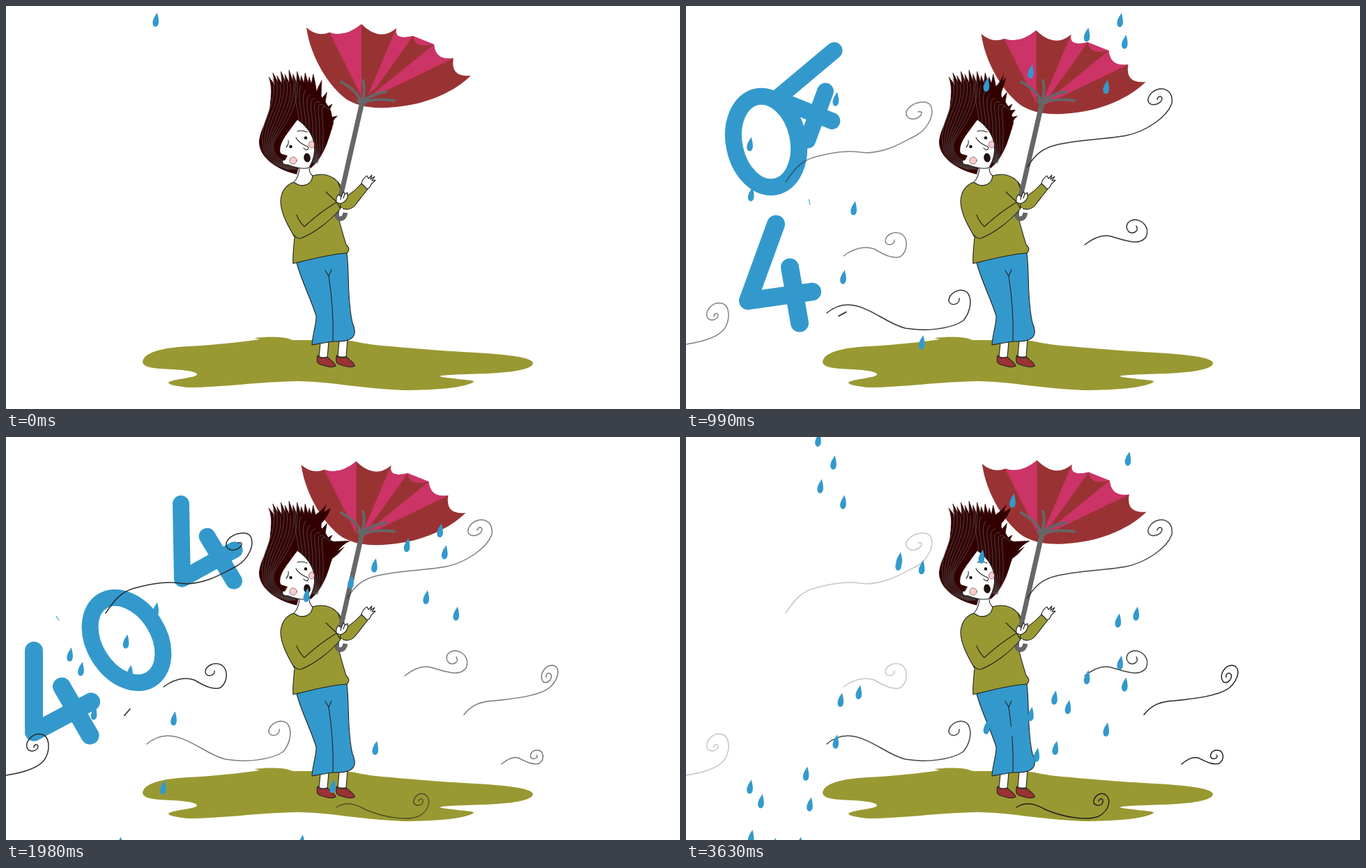
Write an HTML page that moves like this. It is 967x579 px and loops after 3.96 s.

```html
<!DOCTYPE html>
<html lang="en">
<head>
<meta charset="utf-8">
<title>Windy day</title>
<style>
html, body { margin: 0; width: 100%; height: 100%; overflow: hidden; background: #fff; }
svg { display: block; width: 100%; height: 100%; }
.line { fill: none; stroke: #222; stroke-linecap: round; stroke-linejoin: round; }
.ink { stroke: #222; stroke-width: 1.1; stroke-linejoin: round; stroke-linecap: round; }
.thin { stroke-width: .5; }
.digit { fill: none; stroke: #39c; stroke-width: 26; stroke-linecap: round; stroke-linejoin: round; }
.olive { fill: #993; } .blue { fill: #39c; } .red { fill: #933; } .pink { fill: #c36; }
.skin { fill: #fff; } .blush { fill: #fcc; } .hair { fill: #300; } .none { fill: none; }
.grey { fill: none; stroke: #666; stroke-linecap: round; }
</style>
</head>
<body>
<svg viewBox="0 0 967 579">
  <path class="olive" d="M196 511C198 497 225 491 260 489C300 487 335 483 364 479L356 477C372 475 400 474 411 480H485C500 481 510 485 530 487C580 492 650 497 690 499C730 502 757 506 756 514C752 526 700 528 660 529C635 530 615 531 626 533C650 537 672 537 671 540C660 548 620 552 570 552C510 550 470 540 420 539C360 540 310 548 262 548C240 546 230 543 234 540C245 535 275 534 274 529C272 523 240 522 220 521C205 520 196 517 196 511Z"/>

  <g id="canopy">
    <path class="red" d="M431 31Q447 45 464 38Q486 46 510 26Q536 52 560 32Q556 50 584 43Q586 62 614 55Q616 79 642 75Q637 103 667 100C645 122 605 141 560 145C530 148 510 146 490 135C465 118 437 75 431 31Z"/>
    <path class="pink" d="M464 38Q486 46 510 26V130ZM560 32Q556 50 584 43L614 55L520 126ZM614 55Q616 79 642 75L524 132L520 130Z"/>
    <path class="red" d="M584 43Q586 62 614 55L522 130Z"/>
  </g>

  <g id="woman">
    <path class="skin ink" d="M451 484L449 505H461L463 482M478 480L476 504H488L490 478"/>
    <path class="red ink" id="shoe" d="M447 502C445 510 447 514 451 515C458 517 467 521 473 517C472 512 464 508 461 504C456 507 450 505 447 502Z"/>
    <use href="#shoe" x="27.5"/>
    <path class="blue ink" d="M417 369C440 362 465 356 489 355C493 385 489 420 497 455C501 465 502 472 496 477C490 482 480 482 469 482C460 483 450 485 439 487C440 470 446 455 445 445C435 415 424 395 417 369Z"/>
    <path class="none ink" d="M458 380L463 388L467 379M463 388C468 420 470 450 469 482"/>
    <g id="locks" class="hair" stroke="#300" stroke-width=".6"></g>
    <path class="hair" d="M418 242C390 236 364 219 363 196C364 176 379 160 379 138L382 121L440 116L456 134L466 150L470 168C463 190 458 216 436 234Z"/>
    <g id="sway">
      <path class="hair" d="M432 118C445 112 455 104 460 96L456 108L466 102C462 114 456 122 446 130Z"/>
      <path class="hair" d="M452 142L470 150L494 149C484 154 480 159 476 164L486 157C478 168 472 172 464 178Z"/>
    </g>
    <g id="strands" class="none" stroke="#555" stroke-width=".8"></g>
    <path class="skin" d="M421 228L415 250L422 261L438 258L440 244L435 228Z"/>
    <path class="none ink" d="M421 233Q420 245 414 252M435 233Q435 240 440 244"/>
    <path class="skin ink" d="M418 163C404 180 391 194 391 208C395 216 400 214 401 219C394 222 396 229 404 228C415 232 428 235 435 232C441 222 444 210 442 198C440 184 430 171 418 163Z"/>
    <path class="hair" d="M418 163C404 184 390 197 394 212L404 215L400 222C392 220 384 206 387 193C395 178 406 170 418 163Z"/>
    <circle class="blush ink thin" cx="412" cy="222" r="5.2"/>
    <ellipse class="blush ink thin" cx="438.5" cy="199" rx="4" ry="5"/>
    <ellipse cx="432" cy="218" rx="4.8" ry="6.5" fill="#211" transform="rotate(-8 432 218)"/>
    <circle cx="408.5" cy="202" r="2.2"/><circle cx="430" cy="189.500" r="2.2"/>
    <path class="none ink" d="M402 203Q406 199 405 193M418 180Q425 178 432 181M416 189Q420 197 433 202C436 206 430 209 427 204"/>
    <path class="olive ink" d="M462 258L475 252C482 258 484 266 484 275C494 271 502 264 510 255L519 263L501 286C495 293 487 294 480 289Z"/>
    <path class="olive ink" d="M413 253C424 262 438 258 440 244C455 239 469 244 476 253C483 266 481 282 477 303C480 318 485 332 488 343C494 348 492 352 489 355C460 357 430 366 412 370C411 358 413 345 414 332C406 318 394 298 394 280C395 266 402 257 413 253Z"/>
    <path class="none ink" d="M459 267Q467 275 475 282"/>
    <path class="skin ink" d="M510 255Q512 247 518 244L520 248L525 243L523 249L529 245L525 251L530 250L524 256Q522 262 518 263Z"/>
    <g class="grey">
      <path stroke-width="7" stroke-linecap="butt" d="M511 138L480 274M479 292L475 300C474 307 485 309 487 297"/>
      <path stroke-width="4" d="M510 137C504 124 494 116 481 109M511 136Q516 120 512 107M511 137Q526 126 545 123M511 139Q530 132 557 136"/>
      <path stroke-width="7" d="M507 136L511 141L518 134"/>
    </g>
    <path class="skin" d="M478 290L483 290L481 302L478 302Z"/>
    <path class="olive" d="M414 318L428 317L474 282L480 291C466 308 442 327 422 334Z"/>
    <path class="none ink" d="M417 300Q420 309 428 317Q448 298 474 282L480 291C466 308 442 327 422 334Q417 334 413 329"/>
    <path class="skin ink" d="M474 282Q473 274 477 271L481 274L484 267L487 270L490 268L490 275Q487 282 480 284ZM481 274L480 278M486 270L484 276"/>
  </g>

  <g id="lower">
    <path id="four" class="digit" d="M0 0L-40 110L52 97M20 62L34 142"/>
    <path class="line" stroke-width="1.5" d="M90 132L101 126"/>
    <path d="M47 -36L49 -28" stroke="#39c"/>
  </g>
  <ellipse id="zero" class="digit" style="stroke-width:24" rx="46" ry="66"/>
  <g id="upper"><use href="#four" transform="scale(.92)"/></g>

  <g id="winds" class="line" stroke-width="1.5">
    <g class="quick">
      <path d="M143 253C155 235 165 222 185 217C215 209 235 207 258 211C290 210 310 196 330 186C348 176 357 155 351 143C346 135 328 137 319 147C311 157 320 164 329 162C338 159 342 150 333 152"/>
      <path d="M226 359C240 349 255 344 270 349C285 358 298 364 308 360C318 352 319 335 310 328C300 322 286 328 286 338C288 346 300 343 299 336"/>
      <path d="M0 486C20 483 45 477 55 464C65 448 62 428 50 427C38 425 28 437 30 446C33 454 46 452 46 444C45 440 40 442 40 446"/>
    </g>
    <g class="slow">
      <path d="M490 231C500 215 510 205 530 200C560 192 600 192 632 186C660 180 690 160 697 140C699 125 690 118 680 119C668 121 660 132 664 139C670 145 683 140 683 132C681 128 677 130 676 134"/>
      <path d="M572 343C586 332 601 327 613 332C631 337 650 345 660 332C666 318 655 307 643 307C632 309 629 318 636 325C644 328 650 322 646 316"/>
      <path d="M202 441C215 430 230 427 245 431C270 437 290 457 315 463C345 468 380 464 398 452C409 438 411 420 403 411C393 404 377 412 377 424C380 432 393 429 392 420"/>
    </g>
    <g class="fading">
      <path d="M657 399C668 385 680 380 700 379C730 376 765 372 780 360C794 347 796 330 784 328C772 328 764 343 771 352C778 355 784 347 782 341C778 337 774 341 775 345"/>
      <path d="M711 470C719 463 728 459 735 461C745 466 756 472 765 469C774 462 771 450 762 450C753 450 750 459 755 462C760 463 764 460 761 457"/>
      <path d="M474 532C486 524 500 526 515 535C540 546 575 552 592 545C610 535 610 517 600 513C592 510 584 518 585 526C590 532 599 529 598 522C597 518 593 520 592 523"/>
    </g>
  </g>
  <path id="rain" class="blue"/>
</svg>

<script>
const STEP = 330, STEPS = 12;
const BLAST = 9; // the strong gust that tosses everything
const $ = id => document.getElementById(id);

function seeded(seed) {
  return () => (seed = seed * 16807 % 2147483647) / 2147483647;
}

function add(parent, d) {
  const path = document.createElementNS('http://www.w3.org/2000/svg', 'path');
  path.setAttribute('d', d);
  parent.append(path);
}

function place(node, visible, transform) {
  node.setAttribute('visibility', visible ? 'visible' : 'hidden');
  node.setAttribute('transform', transform);
}

// Pointed locks along the top of the head, then down its right side
function addLock(x, y, tipX, tipY) {
  add($('locks'), `M${x - 5} ${y}Q${x - 3} ${y - 18} ${tipX} ${tipY}Q${x + 6} ${y - 14} ${x + 6} ${y}Z`);
}
for (let i = 0; i < 12; i++) {
  const lean = (i - 5) * .8;
  addLock(385 + i * 5, 132, 381 + i * 5 + lean, 97 + Math.abs(i - 5) - i % 2 * 5);
}
for (let i = 0; i < 4; i++) addLock(446 + i * 5, 142 + i * 12, 453 + i * 7.5, 107 + i * 17);

// Strands: one bundle sweeps down the left, another down the right
for (let i = 0; i < 8; i++) {
  add($('strands'), `M${383 + i * 5} ${104 + i % 3 * 4}C${391 + i * 4} 140 ${366 + i * 6} 160 ${368 + i * 3} ${194 - i}S${382 + i * 3} 225 ${404 + i * 2} 235`);
  add($('strands'), `M${416 + i * 7} ${108 + i * 6}C${412 + i * 5} 135 ${420 + i * 5} 150 ${420 + i * 5} ${164 + i * 3}S${446 + i} 205 ${440 + i} 226`);
}

// Each digit drifts through key points; all swing back at the middle one
const keySteps = [2, 4, 6, 8, BLAST];
const digits = [
  { id: 'lower', tilt: 0, swing: -20, points: [[112, 296], [146, 331], [40, 307], [67, 304], [251, 371]] },
  { id: 'zero', tilt: -12, swing: -20, points: [[90, 177], [140, 213], [173, 292], [175, 294], [579, 428]] },
  { id: 'upper', tilt: 30, swing: -51, points: [[172, 111], [253, 17], [251, 96], [317, 106], [451, -47]] }
];

function between(points, step) {
  const i = Math.max(1, keySteps.findIndex(key => key >= step));
  const t = (step - keySteps[i - 1]) / (keySteps[i] - keySteps[i - 1]);
  return points[i].map((to, axis) => points[i - 1][axis] + (to - points[i - 1][axis]) * t);
}

function showDigits(step) {
  const visible = step >= keySteps[0] && step <= BLAST;
  const turn = Math.max(0, 1 - Math.abs(step - 6) / 2);
  for (const { id, tilt, swing, points } of digits) {
    place($(id), visible, visible ? `translate(${between(points, step)}) rotate(${tilt + swing * turn})` : '');
  }
}

// The canopy bobs as a triangle wave, thrown half a period on by the blast
function showCanopy(step) {
  const phase = (step < BLAST ? step : step + 4.5) % 9;
  const drop = 3 * Math.min(phase, 9 - phase);
  place($('canopy'), true, `translate(${-drop * .83} ${drop})`);
}

function showHair(step) {
  const beat = step < BLAST ? step : step - 1;
  const reach = Math.sin(Math.PI * beat / 4) ** 2;
  place($('sway'), reach > .01, `translate(${452 * (1 - reach)} 0) scale(${reach} 1)`);
}

const wave = (step, period) => Math.cos(2 * Math.PI * (step - 2) / period);
const darkness = {
  quick: step => step && .6 + .38 * wave(step, 3.7),
  slow: step => step && .78 + .2 * wave(step, 7.5),
  fading: step => step > 1 ? Math.max(0, 1 - .19 * ((step + 3) % 7)) : 0
};

function showWinds(step) {
  for (const kind in darkness) {
    document.querySelector('.' + kind).setAttribute('opacity', darkness[kind](step));
  }
}

// Rain thickens with time; a few drops hang where they came down
const random = seeded(404);
const drops = Array.from({ length: 30 }, (_, i) => i
  ? { x: 90 + 570 * random(), y: 600 * random() }
  : { x: 215, y: 20 });
const hanging = [[163, 585], [646, 254], [530, 447], [248, 367], [222, 378], [620, 264], [503, 457]];

const drawDrop = (x, y) =>
  `M${x + 2} ${y - 10.5}c-3 4.500 -7 10.500 -6.500 15.500c.5 7 8 6 8.500 -1c.5 -5 -1 -10 -2 -14.500Z`;

function showRain(step) {
  const falling = drops.slice(0, 1 + 8 * Math.sqrt(step));
  const resting = hanging.slice(0, Math.max(0, step - 3));
  const shapes = falling.map(({ x, y }) => drawDrop(x, (y + 38 * step) % 600))
    .concat(resting.map(([x, y]) => drawDrop(x, y)));
  $('rain').setAttribute('d', shapes.join(''));
}

function show(step) {
  for (const part of [showCanopy, showHair, showDigits, showWinds, showRain]) part(step);
}

let shown = 0;
function tick(now) {
  const step = Math.floor(now / STEP) % STEPS;
  if (step !== shown) show(shown = step);
  requestAnimationFrame(tick);
}
show(shown);
requestAnimationFrame(tick);
</script>
</body>
</html>
```
